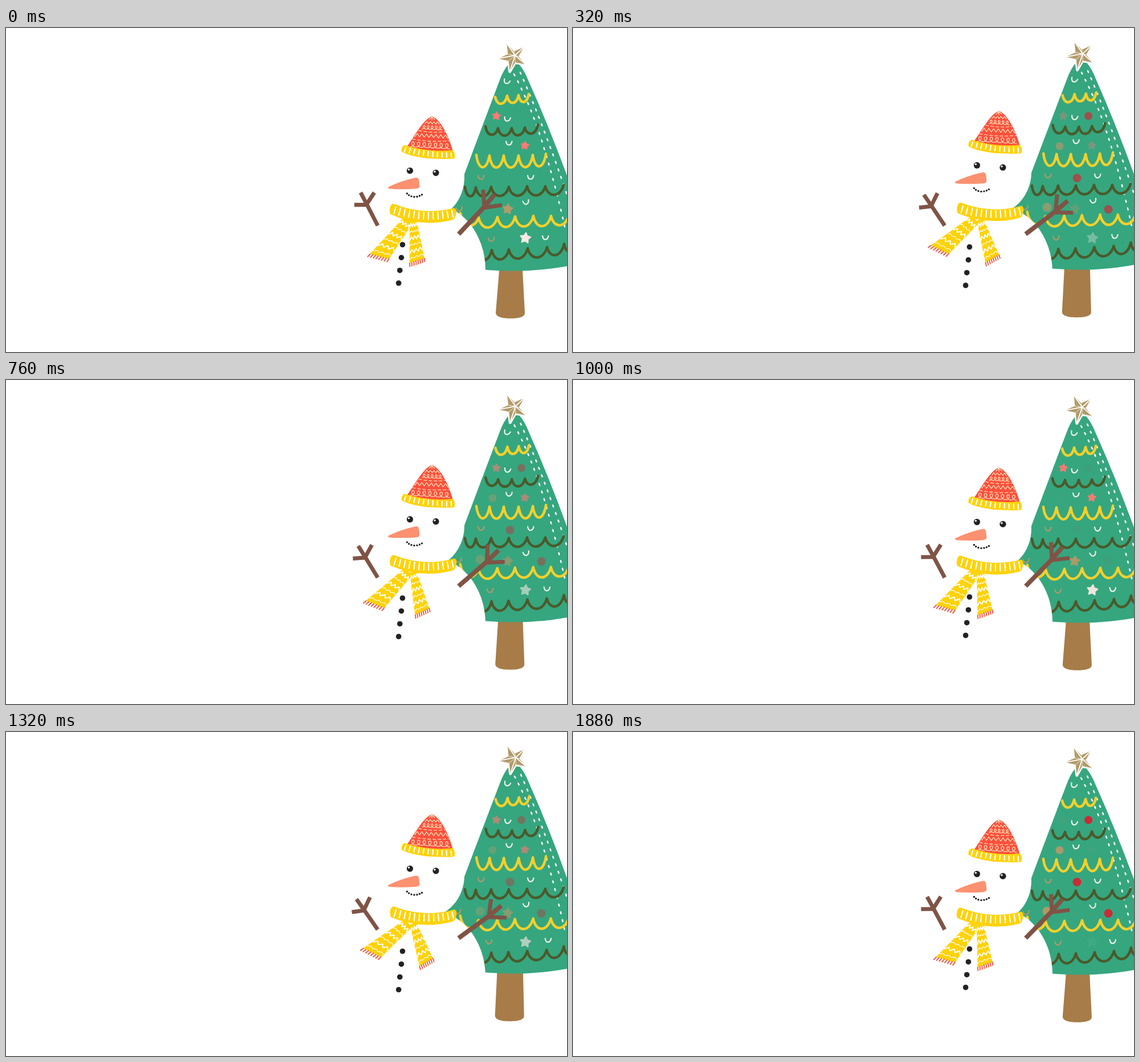
Write an HTML page that moves like this. It is 984 px wide and 569 px high and loops after 1920 ms.

```html
<!DOCTYPE html>
<html lang="en">
<head>
<meta charset="utf-8">
<title>Snowman and tree</title>
<style>
html, body { margin: 0; width: 100%; height: 100%; overflow: hidden; background: #fff; }
svg { display: block; width: 984px; height: 569px; }
path, line { stroke-linecap: round; stroke-linejoin: round; }
.line { fill: none; }
.arm { fill: none; stroke: #7f5446; stroke-width: 7; }
.arm path { stroke-linecap: butt; stroke-linejoin: miter; }
.knit { fill: none; stroke: #ffdcb4; stroke-width: 1.3; }
.tick { stroke: #fff; stroke-width: 2.2; }
</style>
</head>
<body>
<svg viewBox="0 0 984 569">
  <g id="tree">
    <path id="trunk" fill="#a77c49"/>
    <path fill="#36a67f" d="M882 63Q872 74 865 94Q834 176 802 262Q786 290 769 310L740 413Q860 431 930 425Q965 423 1010 413L985 262Q952 172 917 94Q909 74 900 64Z"/>
    <g id="dashes" class="line" stroke="#fff" stroke-width="2.6" opacity=".95">
      <path stroke-dasharray="3 11" d="M902 78Q925 130 950 197T986 300"/>
      <path stroke-dasharray="3 11" d="M891 81Q922 138 945 215T982 358"/>
    </g>
    <g id="garlands" class="line" stroke-width="4.5"></g>
    <g id="smiles" class="line" stroke-width="2.2"></g>
    <g id="topper"></g>
  </g>
  <g id="stars"></g>
  <g id="balls"></g>

  <g id="body">
    <ellipse cx="741" cy="425" rx="100" ry="118" fill="#fff"/>
    <g id="buttons" fill="#222"></g>
  </g>
  <g id="head">
    <ellipse cx="735" cy="262" rx="69" ry="75" fill="#fff"/>
    <g id="face" fill="#222"></g>
    <path fill="#fb9170" d="M671 279Q694 268 718 263Q724 261.500 724.500 269L725.500 277Q725.500 282 719 282.300Q695 284 674 282.500Q668 281.500 671 279Z"/>
    <path fill="#ff503c" d="M747 155C731 161 717 190 702 210Q742 222 784 217C777 190 762 160 747 155Z"/>
    <g id="knit" class="knit"></g>
    <path fill="#ffd20a" d="M699 205.500Q741 219 784 214.500Q789 221 786.500 229Q783 231 740 229Q708 225 694 217.500Q692 210 699 205.500Z"/>
    <g id="brim" class="tick"></g>
  </g>
  <g id="leftTail"></g>
  <g id="rightTail"></g>
  <g id="collar">
    <path fill="#ffd20a" d="M681 309Q732 330 786 316Q791 318 789.500 326Q788 335 783 337Q728 351 674 327Q671 317 676 310Q678 308 681 309Z"/>
    <g id="ribs" class="tick"></g>
  </g>
  <g id="leftArm" class="arm">
    <path d="M652 347L632 308L622 289"/>
    <path d="M633 309L646 289M635 310.500L611 310.500"/>
  </g>
  <g id="rightArm" class="arm">
    <path d="M794 362L838 315L857 292" stroke-width="8"/>
    <path d="M839 314L837 284M836 316L870 311"/>
  </g>
</svg>
<script>
const LOOP = 1920, STEP = 40, HALF = 480;
const $ = id => document.getElementById(id);
const add = (id, markup) => $(id).insertAdjacentHTML('beforeend', markup);
const circle = (x, y, r, fill) =>
  `<circle cx="${x}" cy="${y}" r="${r}"${fill ? ` fill="${fill}"` : ''}/>`;
const pathOf = pts => 'M' + pts.map(p => p.map(v => v.toFixed(2)).join(' ')).join('L');
const WHITE = '#eef3e6', GOLD = '#b29a69', YELLOW = '#f3d02b', OLIVE = '#4a5a2b';

function starPoints(x, y, outer, inner, turn) {
  return Array.from({ length: 10 }, (_, i) => {
    const a = (turn + i * 36) * Math.PI / 180, r = i % 2 ? inner : outer;
    return [x + r * Math.cos(a), y + r * Math.sin(a)];
  });
}

// Garlands: x, y of each cusp, then the dip below it
function garland(color, dip, pts) {
  let d = `M${pts[0]}`;
  for (let i = 1; i < pts.length; i++) {
    const [ax, ay] = pts[i - 1], [bx, by] = pts[i], w = bx - ax;
    const low = (ay + by) / 2 + dip * 1.33;
    d += `C${ax + w * .15} ${low} ${bx - w * .2} ${low} ${bx} ${by}`;
  }
  add('garlands', `<path stroke="${color}" d="${d}"/>`);
}
garland(YELLOW, 13, [[858, 121], [879, 119], [899, 118], [917, 116]]);
garland(OLIVE, 13, [[841, 173], [863, 176], [887, 176], [910, 175], [933, 170]]);
garland(YELLOW, 21, [[825, 223], [848, 224], [873, 224], [899, 224], [924, 223], [947, 221]]);
garland(OLIVE, 16, [[805, 279], [824, 280], [851, 279], [882, 279], [914, 278], [946, 278], [978, 276]]);
garland(YELLOW, 18, [[797, 325], [829, 333], [862, 332], [893, 331], [925, 330], [956, 330], [988, 327]]);
garland(OLIVE, 17, [[826, 391], [852, 390], [882, 389], [915, 387], [949, 385], [979, 379], [1000, 373]]);

// Little hooks: x, y, tilt, colour, sideways drift
const hooks = [
  [878, 94, 20, WHITE, 0], [879, 160, 10, WHITE, 0], [882, 202, 0, WHITE, 0],
  [920, 262, 0, WHITE, 0], [912, 306, -15, WHITE, 1], [946, 368, 0, WHITE, 7],
  [833, 262, 0, GOLD, 0], [795, 318, -10, GOLD, -3], [851, 371, -5, GOLD, -4.5]
].map(([x, y, tilt, color, drift]) => {
  add('smiles', `<path stroke="${color}" d="M-5 -3Q-4 3.500 0 3.500Q4.500 3 5.500 -3"/>`);
  return { el: $('smiles').lastElementChild, x, y, tilt, drift };
});

// Tree topper with facets
const tip = starPoints(889, 51, 26, 10, 246);
const tipPath = pathOf(tip) + 'Z';
add('topper', `<path d="${tipPath}" fill="#fff" stroke="#fff" stroke-width="5"/>
  <path d="${tipPath}" fill="${GOLD}"/>`);
tip.forEach(([x, y], i) => add('topper',
  `<path d="M893 48L${x} ${y}" stroke="#fff" stroke-width="${i % 2 ? .8 : 1.8}"/>`));

for (const [x, y, r, color] of [[860, 154.5, 8, '#fb7a72'], [910, 206.5, 8, '#fb7a72'],
  [880, 318, 10, GOLD], [911, 369, 10.5, '#f8e9e2']])
  add('stars', `<path d="${pathOf(starPoints(x, y, r - 1, r * .48, -83))}Z" fill="${color}" stroke="${color}" stroke-width="2"/>`);

for (const [x, y, r, color] of [[904, 154.5, 7, '#d12634'], [853.5, 207.5, 7, GOLD],
  [884, 263.5, 7.5, '#d12634'], [939, 318.5, 7.5, '#d12634'], [831.5, 315, 8, GOLD]])
  add('balls', circle(x, y, r, color));

[[695.5, 380.5], [693.5, 403.2], [690.8, 425.7], [688.7, 448]].forEach(([x, y]) =>
  add('buttons', circle(x, y, 4.8)));

for (const [x, y] of [[708.5, 250.5], [754, 254.3]])
  add('face', circle(x, y, 5.6) + circle(x - 2, y - 2, 1.7, '#fff'));
[[703.5, 290.7], [706.7, 293.6], [711, 295.6], [716, 296.5], [721, 296.2], [725.5, 294.8], [729.5, 292.7]]
  .forEach(([x, y]) => add('face', circle(x, y, 1.7)));

// Hat pattern
function zigzag(x0, x1, y, tilt, n, amp) {
  const pts = Array.from({ length: n + 1 }, (_, i) =>
    [x0 + (x1 - x0) * i / n, y + tilt * i / n + (i % 2 ? -amp : amp)]);
  add('knit', `<path d="${pathOf(pts)}"/>`);
}
function loops(x0, x1, y, tilt, n, r) {
  const count = n * 14;
  const pts = Array.from({ length: count + 1 }, (_, i) => {
    const k = i / count, a = k * n * 2 * Math.PI;
    return [x0 + (x1 - x0) * k + r * Math.sin(a), y + tilt * k + r * Math.cos(a)];
  });
  add('knit', `<path d="${pathOf(pts)}"/>`);
}
add('knit', '<path d="M747 156L742 161M747 156L747 162M747 156L752 161"/>');
zigzag(735, 760, 166, 1, 8, 2);
loops(730, 765, 174, 2, 5, 3.2);
add('knit', '<path stroke-dasharray="5 4" d="M724 180Q746 185 771 182"/>');
zigzag(717, 775, 188, 3, 14, 3);
add('knit', '<path stroke-dasharray="5 4" d="M713 195Q744 201 777 198"/>');
loops(709, 778, 204, 4, 7, 4.5);

const ticks = (id, n, place) => {
  for (let i = 0; i < n; i++) {
    const [x, y, lean, len] = place(i / (n - 1));
    add(id, `<line x1="${x + lean}" y1="${y}" x2="${x - lean}" y2="${y + len}"/>`);
  }
};
ticks('brim', 11, k => [700 + 81 * k, 209.5 + 19 * k - 9 * k * k, 1.3 - 1.6 * k, 8]);
ticks('ribs', 13, k => [682 + 101 * k, 314 + 32 * k - 26 * k * k, 1.8 - 3 * k, 12]);

// A scarf tail hangs down from 0,0: half widths, then end heights left and right
function tail(id, top, w, left, right) {
  const edge = (k, s) => {
    const half = top + (w - top) * k;
    return [s * half, k * (left + right) / 2 + k * s * (right - left) / 2];
  };
  add(id, `<path fill="#ffd20a" d="${pathOf([[-top, 0], [top, 0], [w, right], [-w, left]])}Z"/>`);
  for (let row = 0; row < 6; row++) {
    const k = .12 + row * .155, n = 6, amp = row % 2 ? 1.2 : 3;
    const pts = Array.from({ length: n + 1 }, (_, i) => {
      const [x, y] = edge(k, (i / n * 2 - 1) * .97);
      return [x, y + (i % 2 ? -amp : amp)];
    });
    add(id, `<path class="line" stroke="#fff" stroke-width="${row % 2 ? 1.2 : 1.9}" d="${pathOf(pts)}"/>`);
  }
  for (let i = 0; i < 8; i++) {
    const [x, y] = edge(1, i / 3.5 - 1);
    add(id, `<line x1="${x * .97}" y1="${y}" x2="${x}" y2="${y + 6}" stroke="#f4523c" stroke-width="1.9"/>`);
  }
}
tail('leftTail', 9, 16, 89, 75);
tail('rightTail', 6, 13.5, 75, 69);

const put = (id, value) => $(id).setAttribute('transform', value);

function pose(t) {
  const cycle = t % (2 * HALF);
  const p = 1 - Math.abs(cycle / HALF - 1);
  // The second glow takes twice as long as the first
  const glow = t < 2 * HALF ? p : t / (2 * HALF) - 1;

  put('tree', `matrix(1 0 ${-.0075 * p} ${1 + .0037 * p} ${1.97 * p} ${-4.6 * p})`);
  const l = 865 - 3.5 * p, r = 906 + 2.3 * p;
  $('trunk').setAttribute('d',
    `M${l} 420L${l - .3} 430L859 500Q859 510 885 510T910 500L${r + .3} 430L${r} 420Z`);
  for (const h of hooks)
    h.el.setAttribute('transform', `translate(${h.x + h.drift * p} ${h.y}) rotate(${h.tilt})`);
  $('stars').setAttribute('opacity', 1 - glow);
  $('balls').setAttribute('opacity', glow);

  put('body', `translate(0 ${6 * p})`);
  put('head', `translate(0 ${-14 * p})`);
  put('leftTail', `translate(706 ${337 - p}) rotate(${38.4 + 17 * p})`);
  put('rightTail', `translate(714 ${337 - p}) rotate(${-5.5 - 17.5 * p})`);
  put('collar', `translate(${p} ${-4.3 * p}) rotate(${-1.6 * p} 732 328)`);
  put('leftArm', `rotate(${-10 * p} 652 347)`);
  put('rightArm', `rotate(${14.4 * p} 794 361)`);
}

function tick() {
  pose(Math.floor(performance.now() % LOOP / STEP) * STEP);
  requestAnimationFrame(tick);
}
tick();
</script>
</body>
</html>
```
